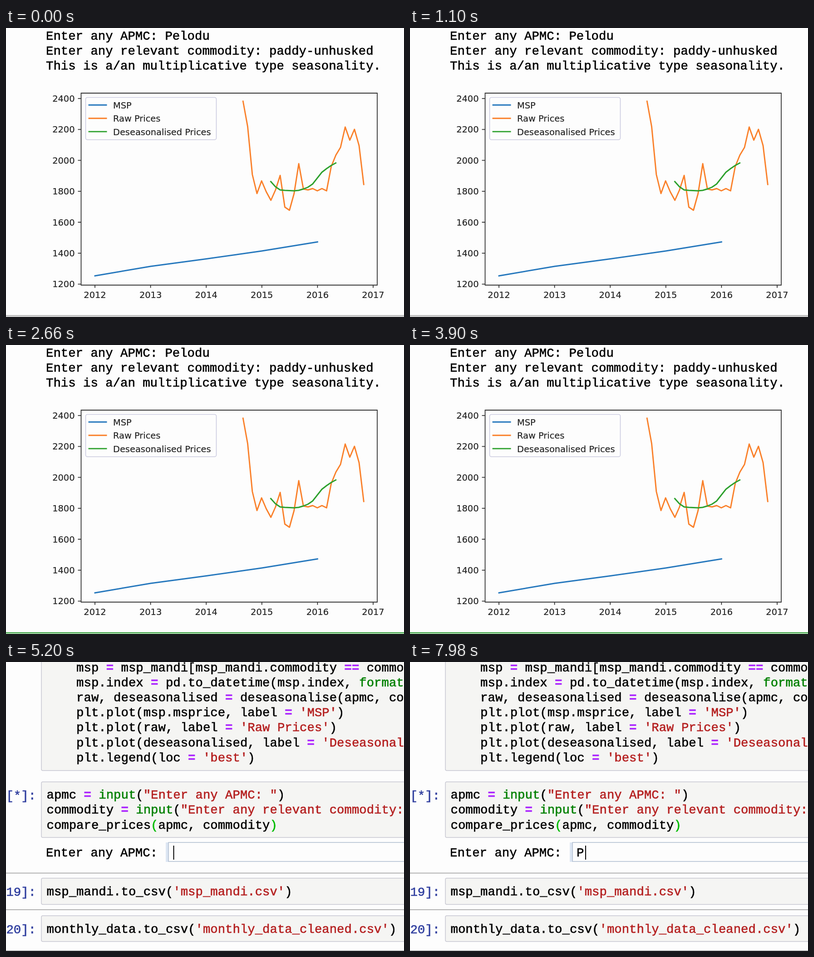
An HTML page that plays this animation: 877x639 px, repeating every 8000 ms.

```html
<!DOCTYPE html>
<html lang="en">
<head>
<meta charset="utf-8">
<title>Notebook price comparison</title>
<style>
  html, body { margin: 0; width: 100%; height: 100%; overflow: hidden; background: #fdfdfd; }
  svg { display: block; width: 100vw; height: 100vh; }
  text { white-space: pre; font: 27.33px "Liberation Mono", monospace; color: #000; }
  text, tspan { fill: currentColor; stroke: currentColor; stroke-width: .6; }
  #chart text { font: 19.4px "DejaVu Sans", sans-serif; color: #222; stroke-width: .2; }
  .axes { fill: none; stroke: #333; stroke-width: 1.8; }
  .series { fill: none; stroke-width: 2.9; stroke-linejoin: round; stroke-linecap: square; }
  .cell { fill: #f5f5f3; stroke: #c8c8d2; stroke-width: 1.5; }
  .rule { fill: #8c8c8c; }
  text.prompt { color: #303f9f; text-anchor: end; }
  .op { color: #a2f; font-weight: bold; }
  .builtin { color: #008000; }
  .str { color: #b52020; }
  .match { color: #0b0; }
</style>
</head>
<body>
<svg viewBox="0 0 877 639" preserveAspectRatio="none">
  <g id="result">
    <text x="88" y="25.5">Enter any APMC: Pelodu</text>
    <text x="88" y="58.5">Enter any relevant commodity: paddy-unhusked</text>
    <text x="88" y="91.5">This is a/an multiplicative type seasonality.</text>
    <g id="chart"></g>
    <g id="idleEdge" class="rule">
      <rect y="635" width="877" height="1.3"/>
      <rect y="638" width="877" height="1"/>
    </g>
    <rect id="activeEdge" y="635" width="877" height="3" fill="#55b05a"/>
  </g>

  <g id="notebook">
    <g class="cell">
      <rect x="78" y="-20" width="820" height="260" rx="3"/>
      <rect x="78" y="265" width="820" height="123" rx="3"/>
      <rect x="78" y="478" width="820" height="58" rx="3"/>
      <rect x="78" y="561" width="820" height="57" rx="3"/>
    </g>
    <g class="rule">
      <rect y="466" width="877" height="1.3"/>
      <rect y="547" width="877" height="1.3"/>
      <rect y="638" width="877" height="1"/>
    </g>
    <g id="code"></g>
    <text class="prompt" x="66" y="303.5">In [*]:</text>
    <text class="prompt" x="66" y="516.5">In [19]:</text>
    <text class="prompt" x="66" y="599.5">In [20]:</text>
    <text x="88" y="430">Enter any APMC: </text>
    <rect x="352" y="399" width="6" height="43" fill="#dde6f3"/>
    <rect x="358" y="399" width="540" height="42" fill="#fdfdfd" stroke="#aebdd0" stroke-width="1.5"/>
    <text id="typed" x="367" y="430"></text>
    <rect id="caret" y="406" width="2" height="31"/>
  </g>
</svg>
<script>
const LOOP = 8000, SELECTED = 2000, RERUN = 3920, TYPED = 7900;
const $ = id => document.getElementById(id);

// Chart
const parts = [];
const label = (x, y, text, anchor = 'start') =>
  parts.push(`<text x="${x}" y="${y}" text-anchor="${anchor}">${text}</text>`);
const series = (x, dx, color, ys) => {
  const points = ys.map((y, i) => `${(x + i * dx).toFixed(1)},${y}`).join(' ');
  parts.push(`<polyline class="series" stroke="${color}" points="${points}"/>`);
};
const BLUE = '#2678bd', ORANGE = '#fa802a', GREEN = '#2ca02c', MONTH = 10.23;

series(196, 122.6, BLUE, [548, 527, 510.5, 493, 473]);
series(522.3, MONTH, ORANGE, [162, 218, 324, 366, 338, 362, 381, 358, 326, 396, 403, 366, 300,
  356, 358, 355, 360, 355, 360, 306, 281, 264, 219, 248, 224, 260, 346]);
series(583.5, MONTH, GREEN, [339.5, 351, 358, 359, 359.5, 360, 359, 356, 352, 345, 332, 319,
  311, 304, 298.5]);

let axes = 'M165.5 144H818V568.5H165.5Z';
for (let i = 0; i < 7; i++) {
  const y = 566.3 - i * 68.4;
  axes += `M165 ${y}h-6.5`;
  label(151.5, y + 7, 1200 + i * 200, 'end');
}
for (let i = 0; i < 6; i++) {
  const x = 196 + i * 122.6;
  axes += `M${x} 568v6.5`;
  label(x, 597, 2012 + i, 'middle');
}
parts.push(`<path class="axes" d="${axes}"/>`,
  '<rect x="175.5" y="153.5" width="288" height="93.5" rx="4" fill="#fdfdfd" stroke="#cbcbe0" stroke-width="1.6"/>');
[['MSP', BLUE], ['Raw Prices', ORANGE], ['Deseasonalised Prices', GREEN]].forEach(([name, color], i) => {
  series(183, 38, color, [170.3 + i * 29.4, 170.3 + i * 29.4]);
  label(236, 178 + i * 29.3, name);
});
$('chart').innerHTML = parts.join('');

// Code cells, with a small syntax highlighter
const highlight = line => line.replace(/('[^']*'|"[^"]*")|(=+)|\b(input|format)\b/g,
  (token, str, op) => `<tspan class="${str ? 'str' : op ? 'op' : 'builtin'}">${token}</tspan>`);
const codeCell = (y, lines) => lines.map((line, i) =>
  `<text x="89.5" y="${y + i * 33.1}">${highlight(line)}</text>`).join('');

$('code').innerHTML = codeCell(21, [
  '    msp = msp_mandi[msp_mandi.commodity == commodity]',
  '    msp.index = pd.to_datetime(msp.index, format',
  '    raw, deseasonalised = deseasonalise(apmc, commodity)',
  "    plt.plot(msp.msprice, label = 'MSP')",
  "    plt.plot(raw, label = 'Raw Prices')",
  "    plt.plot(deseasonalised, label = 'Deseasonalised Prices')",
  "    plt.legend(loc = 'best')"
]) + codeCell(302.3, [
  'apmc = input("Enter any APMC: ")',
  'commodity = input("Enter any relevant commodity: ")',
  'compare_prices(apmc, commodity)'
]).replace('s(apmc, commodity)', 's<tspan class="match">(</tspan>apmc, commodity<tspan class="match">)</tspan>')
  + codeCell(516, ["msp_mandi.to_csv('msp_mandi.csv')"])
  + codeCell(599, ["monthly_data.to_csv('monthly_data_cleaned.csv')"]);

// Timeline
const show = (id, on) => $(id).setAttribute('display', on ? 'inline' : 'none');
const start = performance.now();

function draw(now) {
  const t = Math.max(0, now - start) % LOOP;
  show('result', t < RERUN);
  show('notebook', t >= RERUN);
  show('idleEdge', t < SELECTED);
  show('activeEdge', t >= SELECTED);
  $('typed').textContent = t >= TYPED ? 'P' : '';
  $('caret').setAttribute('x', t >= TYPED ? 386 : 368.5);
  requestAnimationFrame(draw);
}
draw(start);
</script>
</body>
</html>
```
